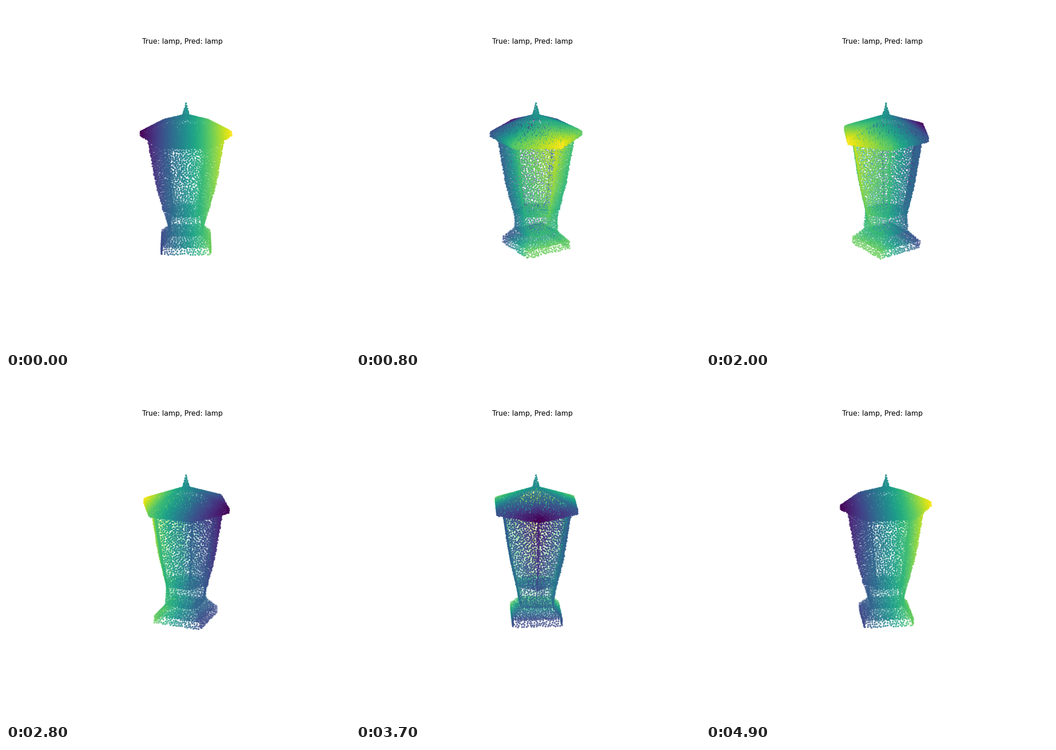
Recreate the animation shown at these times as a matplotlib script. Size 748 by 748 pixels, loop 5000 ms.

```python
import itertools

import matplotlib.pyplot as plt
import numpy as np
from matplotlib.animation import FuncAnimation

SIZE = 748
FRAMES = 50
ELEV = np.radians(20)
CAMERA = 3114              # camera distance, in pixels at the model's centre
CENTER = 391.4, 369.7
rng = np.random.default_rng(4)


def polygon(theta, sides, corner):
    """Radius of a regular polygon with circumradius 1."""
    half = np.pi / sides
    return np.cos(half) / np.cos((theta - corner) % (2 * half) - half)


def hexagon(theta):
    return polygon(theta, 6, np.pi / 6)


def square(theta):
    return polygon(theta, 4, np.pi / 4) * np.sqrt(2)


def circle(theta):
    return np.ones_like(theta)


def place(theta, t, lower, upper):
    """Points between two outlines, each given as (shape, radius, z)."""
    (shape0, r0, z0), (shape1, r1, z1) = lower, upper
    r = (1 - t) * r0 * shape0(theta) + t * r1 * shape1(theta)
    return np.column_stack([r * np.cos(theta), r * np.sin(theta), z0 + t * (z1 - z0)])


def surface(lower, upper):
    (_, r0, z0), (_, r1, z1) = lower, upper
    count = int(1.4 * (r0 + r1) * np.hypot(r1 - r0, z1 - z0))
    q = rng.random(count)
    t = q * (r0 + r1) / (r0 + np.sqrt(r0**2 + (r1**2 - r0**2) * q))
    return place(rng.uniform(0, 2 * np.pi, count), t, lower, upper)


def posts(lower, upper):
    """Denser strips along the six corners of the glass body."""
    t = np.arange(0, 1, 3.4 / abs(upper[2] - lower[2]))
    strips = [place(np.full_like(t, np.pi / 6 + k * np.pi / 3), t, lower, upper)
              for k in range(6)]
    points = np.vstack(strips)
    return points + rng.uniform(-1.5, 1.5, points.shape)


def thin(points, gap):
    """Keep points that are at least one gap away from those kept before."""
    cells, kept = {}, []
    around = list(itertools.product((-1, 0, 1), repeat=3))
    for x, y, z in points.tolist():
        i, j, k = int(x // gap), int(y // gap), int(z // gap)
        near = (p for a, b, c in around for p in cells.get((i + a, j + b, k + c), ()))
        if all((x - p[0])**2 + (y - p[1])**2 + (z - p[2])**2 >= gap**2 for p in near):
            cells.setdefault((i, j, k), []).append((x, y, z))
            kept.append((x, y, z))
    return np.array(kept)


def skin(parts, gap):
    return thin(np.vstack([surface(*part) for part in parts]), gap)


def build_lamp():
    rim_top, rim_low = (hexagon, 98.3, 101.5), (hexagon, 98.3, 92)
    body = [(hexagon, 82.5, 92), (hexagon, 65, -16), (hexagon, 49.5, -80)]
    neck = (square, 35.3, -127)
    slab_top, slab_low = (square, 53.5, -148), (square, 53.5, -163.5)
    roof = [(rim_low, rim_top), (rim_top, (hexagon, 7, 137.5)),
            ((hexagon, 0, 92), rim_low)]
    stand = [
        (body[1], body[0]), (body[2], body[1]),
        ((hexagon, 0, -80), body[2]), (neck, body[2]),
        ((square, 0, -127), neck), (slab_top, neck),
        ((square, 0, -148), slab_top), (slab_low, slab_top),
    ]
    spire = np.vstack([[[0, 0, 165]], surface((circle, 7, 137), (circle, 0.3, 164))])
    return np.vstack([skin(roof, 3.4), skin(stand, 3.8), thin(spire, 3.3),
                      posts(body[1], body[0]), posts(body[2], body[1])])


def project(points, azim):
    x, y, z = points.T
    right = y * np.cos(azim) - x * np.sin(azim)
    front = x * np.cos(azim) + y * np.sin(azim)
    up = z * np.cos(ELEV) - front * np.sin(ELEV)
    near = front * np.cos(ELEV) + z * np.sin(ELEV)
    scale = CAMERA / (CAMERA - near)
    screen = np.column_stack([CENTER[0] + right * scale, CENTER[1] - up * scale])
    return screen, near


lamp = build_lamp()
side = lamp[:, 1]
colors = plt.get_cmap("viridis")((side - side.min()) / np.ptp(side))

fig = plt.figure(figsize=(8, 8), dpi=SIZE / 8, facecolor="white")
ax = fig.add_axes([0, 0, 1, 1])
ax.set(xlim=(0, SIZE), ylim=(SIZE, 0))
ax.axis("off")
fig.text(0.5125, 0.8904, "True: lamp, Pred: lamp", fontsize=11.9,
         family="DejaVu Sans", ha="center", va="baseline")
cloud = ax.scatter(lamp[:, 0], lamp[:, 1], s=3.8, linewidths=1.5)


def update(frame):
    screen, near = project(lamp, 2 * np.pi * frame / FRAMES)
    shaded = colors.copy()
    shaded[:, 3] = 0.3 + 0.7 * (near - near.min()) / np.ptp(near)
    order = np.argsort(near)
    cloud.set_offsets(screen[order])
    cloud.set_facecolor(shaded[order])
    cloud.set_edgecolor(shaded[order])
    return (cloud,)


animation = FuncAnimation(fig, update, frames=FRAMES, interval=100,
                          repeat=True, repeat_delay=0, blit=False)
plt.show()
```
